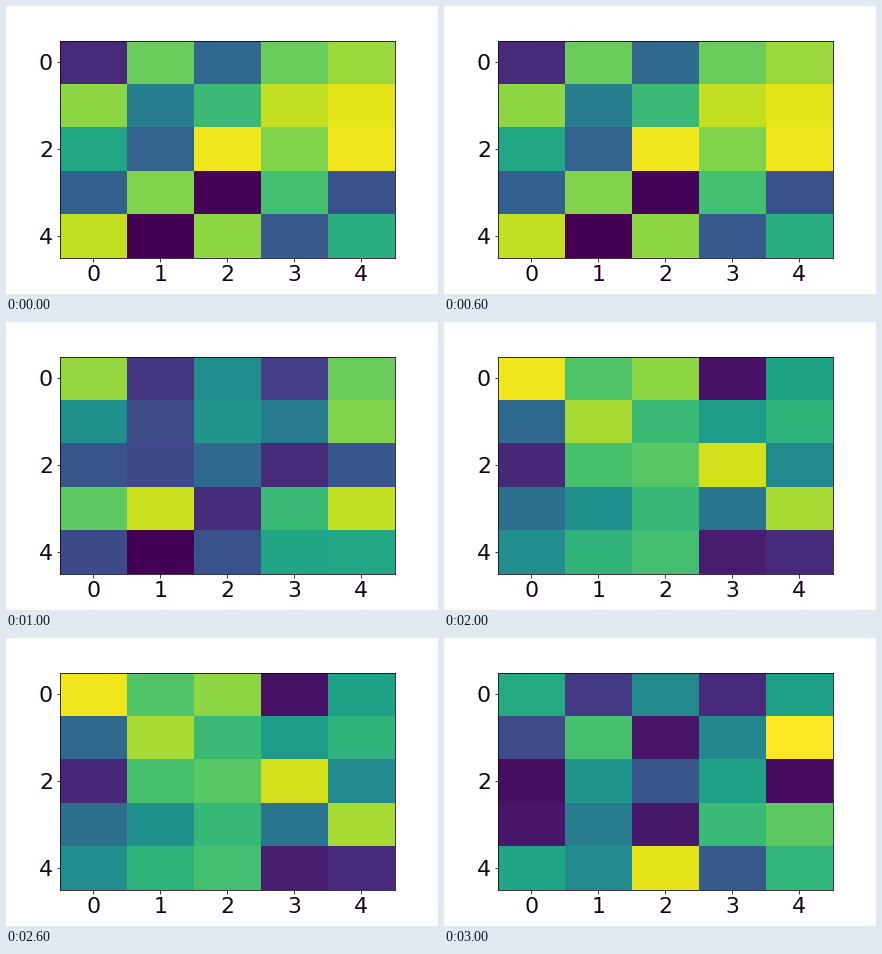
Write a matplotlib script that moves like this. It is 432x288 px and loops after 4 s.

```python
import numpy as np
import matplotlib.pyplot as plt
from matplotlib.animation import FuncAnimation

INK = "#120416"

# One 5x5 grid per step, values in percent of the colour map.
GRIDS = np.array([
    [[12, 77, 34, 77, 85],
     [83, 42, 68, 91, 96],
     [60, 32, 98, 81, 98],
     [31, 81, 1, 70, 25],
     [91, 0, 83, 28, 63]],
    [[84, 16, 49, 18, 77],
     [50, 23, 52, 41, 81],
     [26, 22, 34, 12, 27],
     [75, 92, 13, 68, 91],
     [22, 0, 25, 59, 60]],
    [[98, 73, 83, 5, 58],
     [34, 87, 68, 55, 65],
     [11, 71, 74, 93, 48],
     [37, 50, 67, 39, 87],
     [49, 65, 70, 8, 12]],
    [[61, 17, 48, 12, 57],
     [23, 71, 6, 46, 100],
     [4, 52, 26, 57, 3],
     [6, 42, 7, 68, 75],
     [59, 48, 96, 28, 66]],
]) / 100

plt.rcParams["font.family"] = "DejaVu Sans"

fig = plt.figure(figsize=(6, 4), dpi=72, facecolor="white")
ax = fig.add_axes([0.125, 0.125, 0.775, 0.755])
heatmap = ax.imshow(GRIDS[0], cmap="viridis", vmin=0, vmax=1,
                    aspect="auto", interpolation="nearest")
ax.set_xticks(range(5))
ax.set_yticks(range(0, 5, 2))
ax.tick_params(labelsize=22, color=INK, labelcolor=INK)
for spine in ax.spines.values():
    spine.set_color(INK)


def update(step):
    heatmap.set_data(GRIDS[step])
    return [heatmap]


anim = FuncAnimation(fig, update, frames=len(GRIDS), interval=1000,
                     repeat=True, repeat_delay=0)
plt.show()
```
